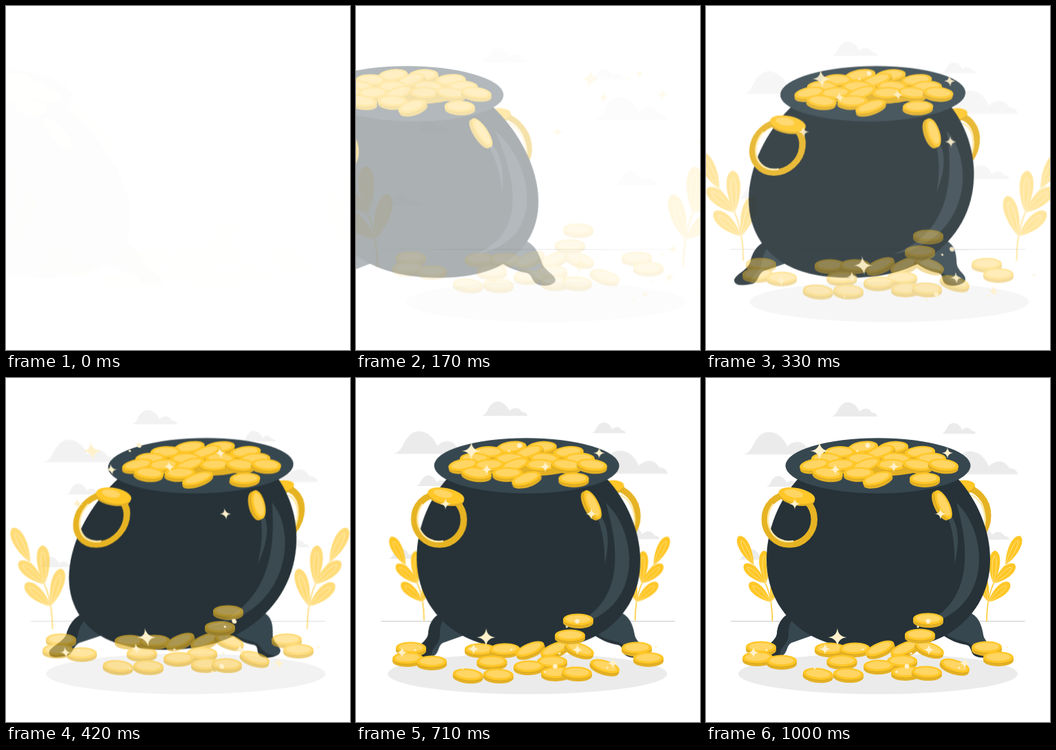
Animation of 500 by 500 pixels, one loop 1.04 s. Source, as an HTML page:

```html
<!DOCTYPE html>
<html lang="en">
<head>
<meta charset="utf-8">
<title>Pot of gold</title>
<style>
  html, body { margin: 0; width: 100%; height: 100%; overflow: hidden; background: #fff; }
  svg { display: block; width: 100vw; height: 100vh; }
</style>
</head>
<body>
<svg viewBox="0 0 500 500">
  <defs>
    <g id="coin">
      <path d="M-22 0V4.5A22 8.5 0 0 0 22 4.5V0Z" fill="#e4b125"/>
      <path d="M-21.5 2.2A22 8.5 0 0 0 21.5 2.2" fill="none" stroke="#cb9b1c" stroke-width=".6"/>
      <ellipse rx="22" ry="8.5" fill="#ffc727"/>
      <ellipse cy="-.5" rx="17.5" ry="5.8" fill="#ffd563"/>
    </g>
    <path id="cloud" d="M0 0C6 -1 8 -7 11 -13C15 -20 19 -23 24 -23C32 -23 38 -16 41 -8C44 -12 50 -14 54 -12C58 -10 59 -6 60 -6C64 -6 67 -3 67 0Z"/>
  </defs>
  <g id="clouds" fill="#ebebeb"></g>
  <ellipse id="floor" cx="250" cy="353.9" rx="216" ry=".3" fill="#263238"/>
  <g id="plants"></g>
  <ellipse id="shadow" cx="250" cy="430" rx="203" ry="29.5" fill="#ebebeb"/>
  <g id="pot">
    <!-- far handle -->
    <ellipse cx="373" cy="200" rx="37" ry="41" fill="none" stroke="#e6b323" stroke-width="9"/>
    <path d="M386 170C402 178 410 200 403 221" fill="none" stroke="#ffe9a8" stroke-width="2.6"/>
    <g transform="translate(370 158) rotate(-8)">
      <ellipse cy="3" rx="21" ry="9" fill="#e4b125"/>
      <ellipse rx="21" ry="9" fill="#ffc727"/>
    </g>
    <g id="legs" transform="translate(3 0)">
      <path d="M118 342C105 349 101 360 100 372C98 384 82 389 80 398C81 408 96 406 107 404C116 400 113 390 121 385L152 374Z" fill="#37474f"/>
      <path d="M118 342C105 349 101 360 100 372C98 384 82 389 80 398C81 408 96 406 104 403C106 388 116 390 117 372C117 362 119 354 126 347Z" fill="#263238"/>
      <path d="M383 342C395 349 398 362 400 373C402 385 416 390 416 398C415 406 398 408 388 404C381 400 384 391 376 387C362 385 352 379 343 373Z" fill="#37474f"/>
      <path d="M343 370C353 380 366 380 378 385C388 389 387 400 410 404C401 408 392 407 387 403C381 399 384 391 376 388C362 386 350 380 340 373Z" fill="#263238"/>
    </g>
    <!-- body -->
    <path d="M135 145C106 177 88 220 88 264C88 313 113 351 150 373C180 390 215 395 250 395S320 390 350 373C388 351 413 313 413 264C413 220 394 177 365 145Z" fill="#263238"/>
    <path d="M364 181C387 203 397 236 397 263C396 320 360 352 309 361C353 343 374 311 376 266C378 238 371 206 364 181Z" fill="#3b4a51"/>
    <path d="M348 194C364 201 372 231 361 271C362 243 359 218 348 194Z" fill="#3b4a51"/>
    <ellipse cx="250" cy="127.5" rx="134.5" ry="40.3" fill="#37474f"/>
    <ellipse cx="248" cy="124" rx="78" ry="19" fill="#e4b125"/>
    <g id="hoard"></g>
    <!-- near handle -->
    <ellipse cx="121.3" cy="205.5" rx="36" ry="36.5" fill="none" stroke="#e6b323" stroke-width="9.5"/>
    <path d="M98 183C79 207 96 243 127 237" fill="none" stroke="#ffe9a8" stroke-width="2.6"/>
    <g transform="translate(132 171) rotate(12)">
      <ellipse cy="2.5" rx="27" ry="11.5" fill="#e4b125"/>
      <ellipse rx="27" ry="11" fill="#ffc727"/>
      <ellipse cx="-5" cy="-2" rx="14" ry="5.5" fill="#ffd563"/>
    </g>
    <use href="#coin" transform="translate(345 184) rotate(64) scale(1.04)"/>
  </g>
  <g id="pile"></g>
  <g id="sparkles" fill="#fff1cb"></g>
</svg>
<script>
const $ = id => document.getElementById(id);
const add = (id, markup) => $(id).insertAdjacentHTML('beforeend', markup);
const range = n => [...Array(n).keys()];

let seed = 20011;
const random = () => (seed = seed * 16807 % 2147483647) / 2147483647;

const cloud = (x, y, width) =>
  add('clouds', `<use href="#cloud" transform="translate(${x} ${y}) scale(${width / 67} ${width / 74})"/>`);
cloud(182, 56, 67);
cloud(342, 81, 50);
cloud(54, 111, 105);
cloud(345, 140, 108);
cloud(87, 158, 50);
cloud(47, 264, 50);
cloud(376, 235, 65);

// A row of evenly spaced coins; most lie nearly flat, a few tilt more.
const row = (id, y, left, right, count) => range(count).forEach(i => {
  const x = left + (right - left) * i / Math.max(1, count - 1);
  const tilt = 24 * (2 * random() - 1) ** 3;
  add(id, `<use href="#coin" transform="translate(${x} ${y}) rotate(${tilt})"/>`);
});
row('hoard', 100.5, 228, 272, 2);
row('hoard', 107.5, 195, 311, 3);
row('hoard', 117, 175, 327, 4);
row('hoard', 126, 158, 345, 6);
row('hoard', 138, 177, 222, 2);
row('hoard', 146, 249, 318, 2);

row('pile', 393, 180, 325, 5);
row('pile', 391, 80, 408, 2);
row('pile', 406, 75, 425, 2);
row('pile', 411, 110, 285, 3);
row('pile', 418, 251, 362, 2);
row('pile', 430, 163, 207, 2);
row('pile', 427, 291, 321, 2);
row('pile', 373, 311, 311, 1);
row('pile', 350, 323, 323, 1);

// A leaf grows straight up from its base, then leans.
const blade = (length, width) =>
  `M0 0C${width} ${-.45 * length} ${width} ${-.95 * length} 0 ${-length}C${-width} ${-.95 * length} ${-width} ${-.45 * length} 0 0`;
const leaf = (x, y, angle, length) => `<g transform="translate(${x} ${y}) rotate(${angle})">
  <path d="${blade(length, 10.5)}" fill="#ffc727"/>
  <path d="${blade(length * .84, 4)}" fill="none" stroke="#ffe7a0" stroke-width=".7"/></g>`;

// The stem is a quadratic curve; leaves pair up along it and one crowns it.
const plant = (x, side) => {
  const at = t => [-27 * t * t, 353.5 - 106 * t + 25 * t * t];
  const inner = t => leaf(...at(t), 33 - 60 * t, 48);
  const outer = t => leaf(...at(t), -48, 42);
  add('plants', `<g transform="translate(${x} 0) scale(${side} 1)">
    <path d="M0 353.5Q0 300.5 -27 272.5" fill="none" stroke="#ffc727" stroke-width="1.5"/>
    ${inner(.28)}${outer(.28)}${inner(.6)}${outer(.6)}${inner(1)}</g>`);
};
plant(96.5, 1);
plant(408, -1);

const star = (x, y, r) => {
  const k = r * .08;
  add('sparkles', `<path transform="translate(${x} ${y})"
    d="M0 ${-r}Q${k} ${-k} ${r} 0Q${k} ${k} 0 ${r}Q${-k} ${k} ${-r} 0Q${-k} ${-k} 0 ${-r}"/>`);
};
const dot = (x, y, r) => add('sparkles', `<circle cx="${x}" cy="${y}" r="${r}"/>`);

// Each cluster leads with a large star.
[
  [165, 106], [188, 133], [273, 129], [351, 109], [341, 197.5], [129, 183],
  [191, 377], [173, 394], [69, 399], [324, 395], [376, 414.5]
].forEach(([x, y], i) => star(x, y, i % 6 ? 8 : 13.5));
for (const [x, y] of [[235, 98], [323, 353.5], [292, 419]]) {
  dot(x, y, 3.4);
  dot(x - 15, y + 8, 1.6);
}
for (const i of range(6)) dot(88 + 70 * i, 405 + 17 * Math.sin(2.2 * i - .6), 1.5);

const easing = 'cubic-bezier(.36, -.01, .5, 1.38)';
const still = 'translate3d(0, 0, 0)';
const arrive = from => [{ opacity: 0, transform: from }, { opacity: 1, transform: still }];
const dash = side => [
  { opacity: 0, transform: `translate3d(${-250 * side}px, 0, 0) skewX(${20 * side}deg)` },
  { opacity: 1, transform: `skewX(${-10 * side}deg)`, offset: .6 },
  { opacity: 1, transform: `skewX(${2 * side}deg)`, offset: .8 },
  { opacity: 1, transform: still }
];
const moves = [
  ['clouds', arrive('translate(0, 30px)')],
  ['floor', arrive(still)],
  ['plants', arrive('scale(1.5)'), 293],
  ['shadow', arrive('translate(30px, 0)')],
  ['pot', dash(1), 247],
  ['pile', arrive('translate(0, -30px)')],
  ['sparkles', dash(-1), 261]
].map(([id, frames, pivot = 250]) => {
  $(id).style.transformOrigin = `250px ${pivot}px`;
  const steps = frames.map(f => ({ ...f, easing }));
  const move = $(id).animate(steps, { duration: 1000, fill: 'both' });
  move.pause();
  return move;
});

// Poses lie 40 ms apart and play at 24 a second; the opening one is held for two beats.
const start = performance.now();
function tick() {
  const ms = (performance.now() - start) % 1040;
  const beat = Math.floor((ms / 10 + .5) * 6 / 25);
  const time = beat < 2 ? 40 : Math.min(1000, (beat + 1) * 40);
  for (const move of moves) move.currentTime = time;
  requestAnimationFrame(tick);
}
tick();
</script>
</body>
</html>
```
